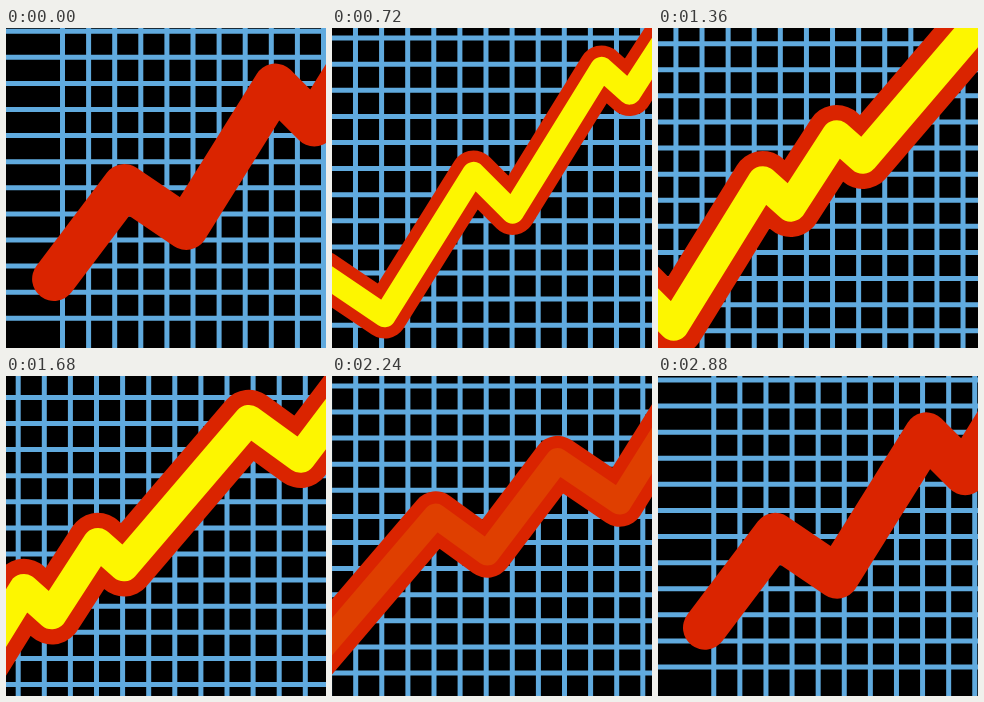
Animation, 320 px wide and 320 px high, one loop 2.96 s. Source, as an HTML page:

```html
<!DOCTYPE html>
<html lang="en">
<head>
<meta charset="utf-8">
<title>Rising chart</title>
<style>
  html, body { margin: 0; width: 100%; height: 100%; overflow: hidden; background: #000; }
  svg { display: block; width: 100%; height: 100%; }
  path { fill: none; }
  #grid { stroke: #60aade; stroke-width: 5; }
  #outer, #inner { stroke-linecap: round; stroke-linejoin: round; }
  #outer { stroke: #da2400; }
  #inner { stroke: #fdf600; }
</style>
</head>
<body>
<svg viewBox="0 0 320 320">
  <path id="grid"/>
  <g id="chart"><path id="outer"/><path id="inner"/></g>
</svg>
<script>
const LOOP = 2960, STEP = 80, CYCLE = 2870;
const CELL = 26.1, GRID_SHIFT = 16 * CELL;
const PERIOD = [626, -430];
const POINTS = [
  [48, 251], [118.3, 158], [180.3, 200], [269.3, 57.5], [308.3, 96.5],
  [397.3, -47.5], [425.3, -22.5], [471.3, -93.5], [497.3, -70.5], [622.3, -216.5]
];

const [grid, chart, outer, inner] =
  ['grid', 'chart', 'outer', 'inner'].map(id => document.getElementById(id));

// The chart repeats once so that the end of a cycle meets its start.
const repeated = POINTS.map(([x, y]) => [x + PERIOD[0], y + PERIOD[1]]);
const line = 'M' + [...POINTS, ...repeated].join('L');
outer.setAttribute('d', line);
inner.setAttribute('d', line);

const ramp = (v, from, to) => Math.min(1, Math.max(0, (v - from) / (to - from)));
const smooth = u => u * u * (3 - 2 * u);
const ease = u => u * (0.5 + 1.5 * u - u * u);

function gridPath(shift) {
  let d = '';
  for (let x = 56.5 - shift; x < 325; x += CELL) if (x > -5) d += `M${x} 0V320`;
  for (let y = 290.3 + shift; y > -5; y -= CELL) if (y < 325) d += `M0 ${y}H320`;
  return d;
}

function draw(ms) {
  const time = Math.floor((ms % LOOP) / STEP) * STEP;
  const cycleTime = time % CYCLE;
  const travel = ease(cycleTime / CYCLE);
  const swell = smooth(ramp(cycleTime, 620, 1120)) - smooth(ramp(cycleTime, 1600, 2600));
  const glow = ramp(cycleTime, 160, 640) - ramp(cycleTime, 1680, 2320);
  const width = 43.8 + 17.2 * swell;

  grid.setAttribute('d', gridPath(travel * GRID_SHIFT));
  chart.setAttribute('transform', `translate(${-travel * PERIOD[0]} ${-travel * PERIOD[1]})`);
  outer.setAttribute('stroke-width', width);
  inner.setAttribute('stroke-width', width / 2);
  inner.setAttribute('stroke-opacity', glow);
}

const start = performance.now();
function tick() {
  draw(performance.now() - start);
  requestAnimationFrame(tick);
}
tick();
</script>
</body>
</html>
```
